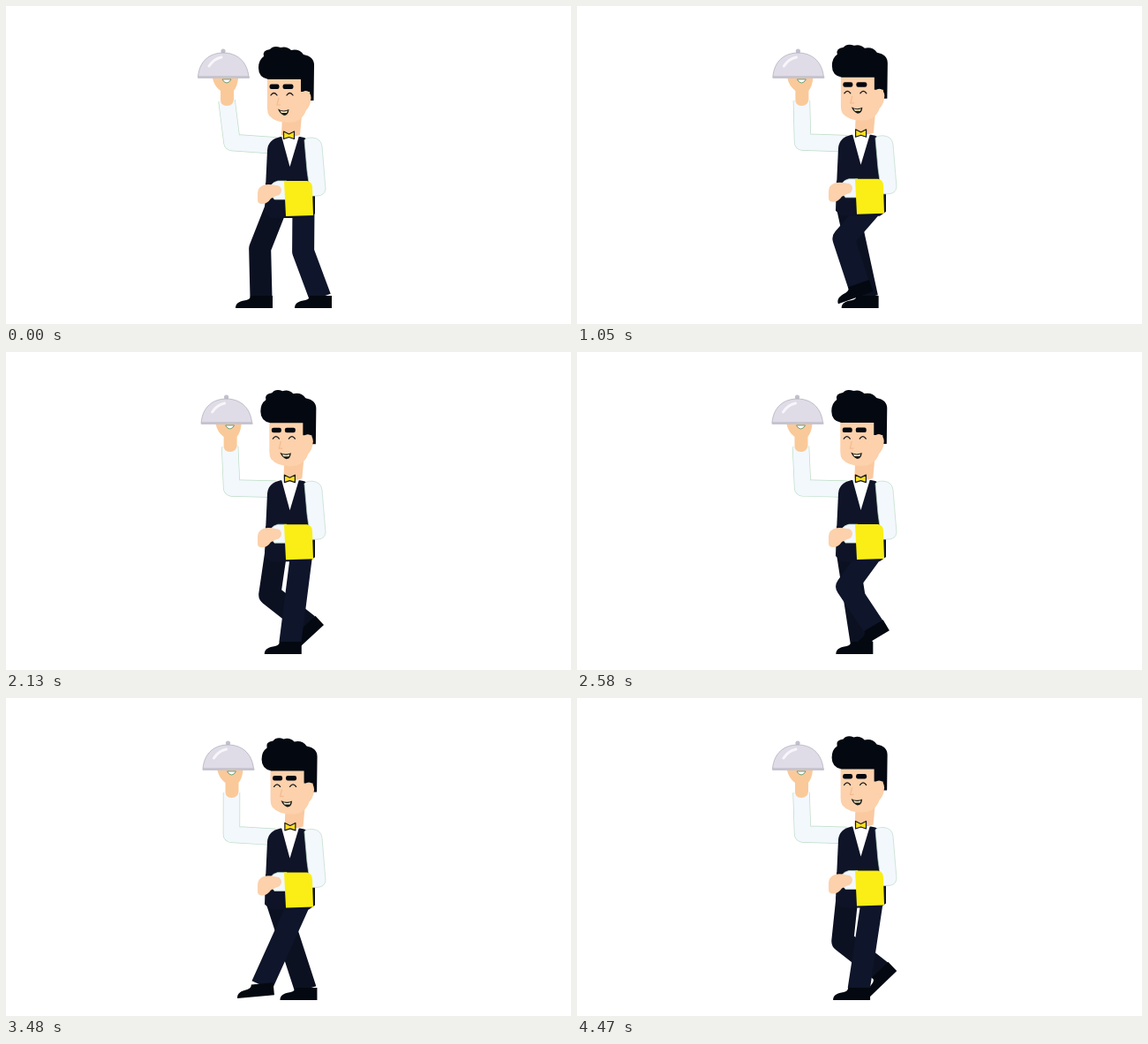
Animation of 640 by 360 pixels, one loop 4.5 s. Source, as an HTML page:

```html
<!DOCTYPE html>
<html lang="en">
<head>
<meta charset="utf-8">
<title>Walking waiter</title>
<style>
  html, body { margin: 0; width: 100%; height: 100%; overflow: hidden; background: #fff; }
  svg { display: block; width: 100%; height: 100%; }
  .leg { fill: none; stroke-width: 25; stroke-linejoin: round; }
  .skin { fill: #fcd1ab; }
  .ink { fill: #040810; }
  .line { fill: none; stroke: #14141c; stroke-width: 1.3; stroke-linecap: round; }
  .sleeve { fill: #f3f8fd; stroke: #bcdcc4; stroke-width: .7; }
</style>
</head>
<body>
<svg viewBox="0 0 640 360">
  <defs>
    <path id="shoe" class="ink" d="M-29 12C-29 6-24 4-17 3Q-12 2-12-2H13V12Z"/>
  </defs>

  <g id="farLeg"><path class="leg" stroke="#0c1122"/><use href="#shoe"/></g>
  <g id="nearLeg"><path class="leg" stroke="#0f152a"/><use href="#shoe"/></g>

  <g fill="none" stroke-linejoin="round">
    <path class="arm" stroke="#bcdcc4" stroke-width="19.4"/>
    <path class="arm" stroke="#f3f8fd" stroke-width="18"/>
  </g>

  <g id="tray">
    <path fill="#fac999" d="M234 82H263Q262 91 258 96V106Q257 113 250 113T243 106V96Q236 91 234 82Z"/>
    <path fill="#fff" stroke="#4f8a58" stroke-width=".8" d="M245 83H255Q253 87 250 87T245 83Z"/>
    <circle cx="246" cy="51" r="2.6" fill="#c3c0cc"/>
    <path fill="#dfdce7" stroke="#aaa8b5" stroke-width=".7" d="M217.500 80C219 62 231 53 246 53S273 62 275 80Z"/>
    <path fill="none" stroke="#f7f6fa" stroke-width="3" stroke-linecap="round" d="M230 68Q235 60 244 58"/>
    <rect x="217" y="79.500" width="59" height="2.500" rx="1" fill="#c6c3cf"/>
  </g>

  <g id="body">
    <path fill="#0e1327" d="M294 200H350V235L343 240H300L293 234Z"/>
    <path fill="#0f1428" d="M311 148H333Q344 149 345 158L347 206H294L296 163Q297 151 311 148Z"/>
    <path fill="#fff" d="M312 147H332L321.500 182Z"/>
    <path class="sleeve" d="M338 152Q339 149 347 149Q357 150 358 159L362 207Q361 215 352 215H345L341 186Z"/>
    <path class="sleeve" d="M300 203Q303 199 308 198H318V219H304Q299 214 300 203Z"/>
    <path class="skin" d="M306 203Q293 200 288 205Q285 207 285 213V220Q285 224 290 224Q296 224 300 218L306 215Q312 214 312 208Q311 203 306 203Z"/>
    <path fill="#faee16" d="M315 198H341Q347 199 347 206L348 237L317 238Z"/>
  </g>

  <g id="head">
    <path fill="#fac9a0" d="M313 124H335L333 146Q322 150 312 146Z"/>
    <path class="skin" d="M296 78H345V108Q344 114 340 118Q335 132 320 132Q305 132 298 124Q296 121 296 116Z"/>
    <path class="ink" d="M297 83Q286 81 286 70Q286 61 292 57Q290 50 299 49Q303 44 311 47Q318 45 323 50Q332 48 337 55Q349 57 349 67L348.500 107H344V97H334V83Z"/>
    <ellipse cx="339.500" cy="104" rx="6" ry="8" class="skin"/>
    <rect x="298.500" y="88.500" width="11" height="5.500" rx="2.200" class="ink"/>
    <rect x="313.500" y="88.500" width="12" height="5.500" rx="2.200" class="ink"/>
    <path class="line" d="M300 101Q303.500 96 307 101M318 101Q321.500 96 325 101"/>
    <path fill="none" stroke="#f3bb92" stroke-width="1.200" d="M309 104L307 112H311"/>
    <path fill="#1a1a1c" d="M308 116.500Q314 120 320.500 117Q320 124 315 124Q310 122 308 116.500Z"/>
    <path fill="#fff6c0" d="M310.500 118.500Q315 120.500 319 118.500L318 121H312Z"/>
  </g>
  <path id="bow" fill="#fadf1e" stroke="#17181c" stroke-width="1.200" stroke-linejoin="round"
    d="M314.500 142L320.500 145L326.500 142V150.500L320.500 148.500L314.500 150.500Z"/>
</svg>

<script>
const LOOP = 4500, TICK = 30, STRIDE = 786;
const THIGH = 50, SHIN = 55.5;
const { PI, sin, cos, sqrt, hypot, max, floor } = Math;
const $ = id => document.getElementById(id);

// First half of a stride: the foot slides back on the ground. Second half: it swings forward.
function footAt(time) {
  const u = time / STRIDE % 1;
  if (u < .5) return { x: 289 + 118 * u, y: 330, angle: 0 };
  const s = 2 * u - 1;
  return {
    x: 314 + 34 * cos(PI * (s / .9) ** 2.2),
    y: 330 - 21 * sin(PI * s ** .8) ** 1.5,
    angle: -37 * sin(PI * s) - 14 * sin(2 * PI * s)
  };
}

// The knee always bends forward, to the left
function kneeOf(hipX, hipY, x, y) {
  const dx = x - hipX, dy = y - hipY, reach = hypot(dx, dy);
  const along = (THIGH ** 2 - SHIN ** 2 + reach ** 2) / (2 * reach);
  const bend = sqrt(max(0, THIGH ** 2 - along ** 2));
  return [hipX + (dx * along - dy * bend) / reach, hipY + (dy * along + dx * bend) / reach];
}

function drawLeg(id, hipX, hipY, shift, time) {
  const { x, y, angle } = footAt(time), ankleX = x + shift;
  const [limb, shoe] = $(id).children;
  limb.setAttribute("d", `M${hipX} ${hipY}L${kneeOf(hipX, hipY, ankleX, y)}L${ankleX} ${y}`);
  shoe.setAttribute("transform", `translate(${ankleX} ${y}) rotate(${angle})`);
}

const move = (id, x, y) => $(id).setAttribute("transform", `translate(${x} ${y})`);

function draw(time) {
  const phase = 2 * PI * time / STRIDE;
  const sway = 2.9 * (1 - cos(phase));
  const lift = 1.5 * (1 - cos(2 * phase));

  drawLeg("farLeg", 306, 228 - lift, 0, time);
  drawLeg("nearLeg", 337 - sway * .5, 228 - lift, 8, time + STRIDE / 2);
  move("body", 0, -lift);
  move("head", sway * .65, -lift);
  move("bow", sway * .25, -lift);
  move("tray", sway, 0);
  const arm = `M306 ${158 - lift}L${256 - sway * .1} ${154.5 - lift * .2}L${250 + sway} 107`;
  document.querySelectorAll(".arm").forEach(p => p.setAttribute("d", arm));
}

function frame() {
  draw(floor(performance.now() % LOOP / TICK) * TICK);
  requestAnimationFrame(frame);
}
frame();
</script>
</body>
</html>
```
